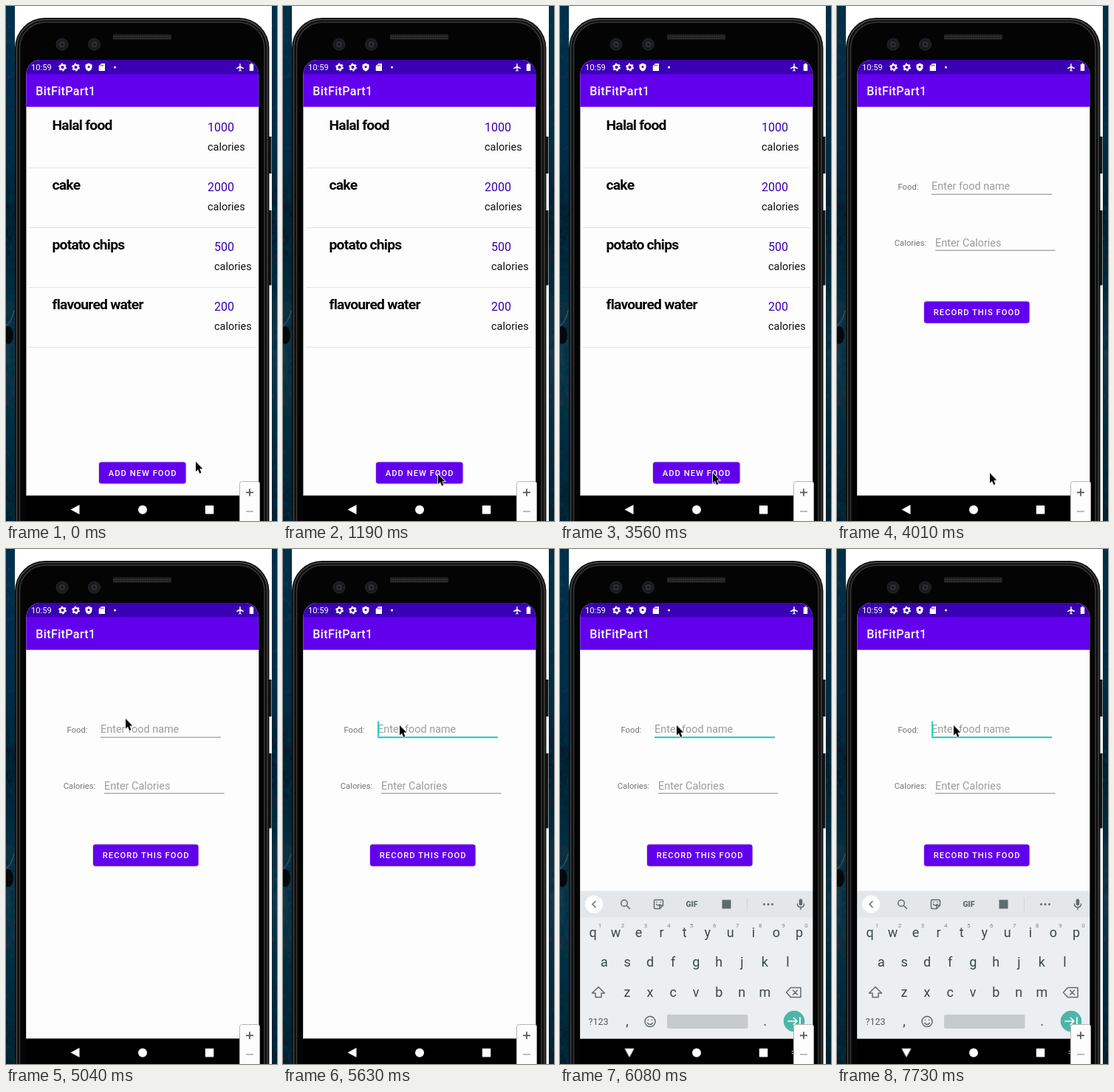
Write an HTML page that moves like this. It is 367 px wide and 698 px high and loops after 8000 ms.

```html
<!DOCTYPE html>
<html lang="en">
<head>
<meta charset="utf-8">
<title>Food log</title>
<style>
  html, body { margin: 0; width: 100%; height: 100%; overflow: hidden; background: #fff; }
  svg { display: block; width: 367px; height: 698px; }
  text { font-family: Roboto, Arial, sans-serif; }
  .line { fill: none; stroke-linecap: round; stroke-linejoin: round; }
  .title { font-size: 16px; font-weight: 500; letter-spacing: .38px; fill: #fff; }
  .name { font-size: 19.24px; font-weight: 700; letter-spacing: -.76px; fill: #050505; }
  .amount { font-size: 16.03px; fill: #3700b3; }
  .unit { font-size: 14.43px; fill: #111; }
  .label { font-size: 11.22px; fill: #757575; }
  .hint { font-size: 14.43px; fill: #9c9c9c; }
  .action { font-size: 11.22px; font-weight: 500; letter-spacing: 1px; fill: #fff; }
  .button { fill: #6200ee; filter: drop-shadow(0 .8px .8px #0005); }
  .key { font-size: 18px; fill: #37474f; text-anchor: middle; }
  .digit { font-size: 8px; fill: #78868c; text-anchor: middle; }

  .pointer, .ripple, .flash, .lift, .home, .form, .focus, .caret,
  .keyboard, .shade, .early, .late, .back { animation: 8s step-end infinite; }
  .ripple, .flash, .form, .focus, .caret, .keyboard, .shade, .late { opacity: 0; }

  .pointer { animation-name: pointer; }
  @keyframes pointer {
    0% { transform: translate(256px, 616px); }
    3.75% { transform: translate(262px, 617px); }
    5.625% { transform: translate(260px, 621px); }
    7.5% { transform: translate(250px, 625px); }
    9.375% { transform: translate(236px, 629px); }
    11.125% { transform: translate(222px, 632px); }
    13% { transform: translate(213px, 633px); }
    14.875% { transform: translate(209px, 633px); }
    24.125% { transform: translate(207px, 632px); }
    26% { transform: translate(206px, 631.5px); }
    53.75% { transform: translate(216px, 600px); }
    55.625% { transform: translate(235px, 520px); }
    57.5% { transform: translate(238px, 425px); }
    59.375% { transform: translate(218px, 320px); }
    61.125% { transform: translate(180px, 242px); }
    63% { transform: translate(161px, 228.5px); }
    64.875% { transform: translate(158px, 235px); }
    66.75%, 100% { transform: translate(157px, 237.5px); }
  }
  .ripple { animation-name: ripple; }
  @keyframes ripple { 0% { opacity: 0; } 31.5% { opacity: .14; } 33.375%, 100% { opacity: 0; } }
  .flash { animation-name: flash; }
  @keyframes flash { 0% { opacity: 0; } 33.375% { opacity: .12; } 35.25%, 100% { opacity: 0; } }
  .lift { animation-name: lift; }
  @keyframes lift {
    0%, 44.5%, 100% { filter: drop-shadow(0 .8px .8px #0005); }
    33.375% { filter: drop-shadow(0 2.5px 1.5px #0006); }
  }
  .home { animation-name: home; }
  @keyframes home { 0% { opacity: 1; } 50.125%, 100% { opacity: 0; } }
  .form { animation-name: form; transform-origin: 184.5px 400px; }
  @keyframes form {
    0% { opacity: 0; transform: none; }
    48.25% { opacity: .85; transform: scale(.96); }
    50.125%, 100% { opacity: 1; transform: none; }
  }
  .focus { animation-name: focus; }
  @keyframes focus { 0% { opacity: 0; } 68.5%, 100% { opacity: 1; } }
  .caret { animation-name: caret; }
  @keyframes caret {
    0%, 76%, 89.125% { opacity: 0; }
    70.375%, 83.5%, 96.625%, 100% { opacity: 1; }
  }
  .keyboard { animation-name: keyboard; }
  @keyframes keyboard {
    0% { opacity: 0; transform: none; }
    74.125% { opacity: .77; transform: translateY(26.5px); }
    76%, 100% { opacity: 1; transform: none; }
  }
  .shade { animation-name: shade; }
  @keyframes shade { 0% { opacity: 0; } 74.125% { opacity: .25; } 76%, 100% { opacity: 0; } }
  .early { animation-name: early; }
  @keyframes early { 0% { opacity: 1; } 76%, 100% { opacity: 0; } }
  .late { animation-name: late; }
  @keyframes late { 0% { opacity: 0; } 76%, 100% { opacity: 1; } }
  .back { animation-name: back; transform-origin: 94px 682.5px; }
  @keyframes back {
    0% { transform: none; }
    74.125% { transform: rotate(-80deg); }
    76%, 100% { transform: rotate(-90deg); }
  }
</style>
</head>
<body>
<svg viewBox="0 0 367 698">
  <defs>
    <linearGradient id="night" x2="0" y2="1">
      <stop offset="0" stop-color="#0c314c"/>
      <stop offset=".3" stop-color="#0c2c45"/>
      <stop offset=".42" stop-color="#081a29"/>
      <stop offset=".58" stop-color="#12303f"/>
      <stop offset=".68" stop-color="#15394b"/>
      <stop offset="1" stop-color="#0a1f2d"/>
    </linearGradient>
    <filter id="rough" x="0" y="0" width="1" height="1">
      <feTurbulence type="fractalNoise" baseFrequency=".16 .09" numOctaves="3" seed="4"/>
      <feColorMatrix values="0 0 0 0 0  0 0 0 0 .03  0 0 0 0 .06  1.8 0 0 0 -.6"/>
      <feComposite operator="in" in2="SourceGraphic"/>
      <feMerge><feMergeNode in="SourceGraphic"/><feMergeNode/></feMerge>
    </filter>
    <pattern id="mesh" width="3" height="3" patternUnits="userSpaceOnUse">
      <rect width="3" height="3" fill="#2b2b2b"/><rect width="1.5" height="1.5" fill="#151515"/>
    </pattern>
    <clipPath id="screen"><rect x="27.4" y="73" width="314.8" height="680" rx="19"/></clipPath>
    <clipPath id="addShape"><rect x="126" y="618.3" width="117.5" height="29" rx="3.2"/></clipPath>
    <g id="gear" fill="none" stroke="#fff">
      <circle r="3.2" stroke-width="2.2"/>
      <circle r="4.6" stroke-width="1.7" stroke-dasharray="2.4 2.417"/>
    </g>
    <g id="camera">
      <circle r="8" fill="#1a1b1d" stroke="#26282a"/>
      <circle r="4" fill="#2b2f34"/><circle r="1.6" fill="#121417"/>
    </g>
  </defs>

  <rect width="367" height="698" fill="#fff"/>
  <g filter="url(#rough)">
    <rect width="12" height="698" fill="url(#night)"/>
    <rect x="360" width="7" height="698" fill="url(#night)"/>
  </g>
  <ellipse cx="3" cy="446" rx="7" ry="12" fill="#04080c"/>
  <path class="line" d="M0 433q7-3 11-20" stroke="#3f6375"/>

  <!-- phone body -->
  <path d="M356 177h3.500v50H356zM356 277h3.500v101.500H356z" fill="#141414"/>
  <rect x="12" y="16" width="344.500" height="780" rx="41" fill="#0d0d0d"/>
  <rect x="14.500" y="18.500" width="339.500" height="780" rx="38.500" fill="none" stroke="#4a4a4a" stroke-width="1.300"/>
  <rect x="18.500" y="22" width="331.500" height="780" rx="35" fill="#040404" stroke="#383838" stroke-width="1.500"/>
  <use href="#camera" x="76" y="52"/>
  <use href="#camera" x="119.500" y="52"/>
  <rect x="145" y="38.500" width="79" height="7" rx="1.500" fill="url(#mesh)"/>

  <g clip-path="url(#screen)">
    <rect x="27" y="73" width="316" height="591" fill="#fdfdfd"/>

    <g class="home">
      <g id="rows"></g>
      <rect class="button lift" x="126" y="618.300" width="117.500" height="29" rx="3.200"/>
      <g clip-path="url(#addShape)" fill="#fff">
        <circle class="ripple" cx="208" cy="633" r="36"/>
        <rect class="flash" x="126" y="618" width="118" height="30"/>
      </g>
      <text class="action" x="138.800" y="637">ADD NEW FOOD</text>
    </g>

    <g class="form">
      <rect x="27" y="137" width="316" height="527" fill="#fdfdfd"/>
      <text class="label" x="82.500" y="248.500">Food:</text>
      <text class="hint" x="128" y="249">Enter food name</text>
      <path d="M128 255.200h163M133 331.200h162.500" stroke="#858585"/>
      <path class="focus" d="M128 255.300h163" stroke="#03cdb9" stroke-width="1.700"/>
      <path class="caret" d="M129 233.500v20.500" stroke="#03cdb9" stroke-width="1.700"/>
      <text class="label" x="77.800" y="325">Calories:</text>
      <text class="hint" x="133" y="325.500">Enter Calories</text>
      <rect class="button" x="118" y="400.500" width="142.500" height="29.200" rx="3.200"/>
      <text class="action" x="130.800" y="419.300">RECORD THIS FOOD</text>
    </g>

    <!-- status and app bars -->
    <rect x="27" y="92" width="316" height="44.700" fill="#6200ee"/>
    <rect x="27" y="73" width="316" height="19.300" fill="#3b00b5"/>
    <text x="34" y="87" font-size="11.200" fill="#fff">10:59</text>
    <use href="#gear" x="76.500" y="83"/>
    <use href="#gear" x="94.500" y="83"/>
    <g fill="#fff">
      <path d="M112 77.500l4.500 2v3.300q0 4-4.500 5.700q-4.500-1.700-4.500-5.700v-3.300z"/>
      <path d="M129 78h5v10h-8.300v-6.700z"/>
      <circle cx="147.500" cy="83" r="1.500"/>
      <path d="M316.300 78.500q.7-1.500 1.400 0v3l4.300 2.500v1.200l-4.300-1.200v2.700l1.200 1v.9l-1.900-.5l-1.900 .5v-.9l1.200-1v-2.700l-4.300 1.200V84l4.300-2.500z"/>
      <path d="M329.800 79h1.500v-1.200h2.400V79h1.500v9h-5.400z"/>
    </g>
    <circle cx="112" cy="82.500" r="1.500" fill="#3b00b5"/>
    <path d="M128.300 79.500v2m1.700-2v2m1.700-2v2" stroke="#3b00b5" stroke-width=".8"/>
    <text class="title" x="40.300" y="121">BitFitPart1</text>

    <!-- navigation bar and keyboard -->
    <rect x="27" y="663.500" width="316" height="40" fill="#000"/>
    <g class="keyboard">
      <rect x="27" y="463.500" width="316" height="200" fill="#eceff1"/>
      <rect x="27" y="463.500" width="316" height="36" fill="#e3e7ea"/>
      <circle cx="46" cy="481.500" r="12" fill="#fff"/>
      <g class="line" stroke="#5f6b70" stroke-width="1.500">
        <path class="early" d="M44.500 477.500l4 4l-4 4"/>
        <path class="late" d="M48 477.500l-4 4l4 4"/>
        <g class="late">
          <circle cx="87" cy="480" r="4.300"/><path d="M90.200 483.200l4.300 4.300"/>
          <path d="M129 475.500h9q1.500 0 1.500 1.500v6l-4.500 4.500h-6q-1.500 0-1.500-1.500v-9q0-1.500 1.500-1.500zM135 487v-4h4M130.500 481.500q2.500 3 5 0M131 478.500v.2M136 478.500v.2"/>
          <path d="M253.500 473v17" stroke="#cdd3d6" stroke-width="1"/>
        </g>
        <path d="M321.500 481q0 4.500 4.500 4.500t4.500-4.500M326 486v2.500"/>
        <path d="M326 476.500v4.500" stroke-width="4.600"/>
        <path d="M52 593.500l8.500 8.500h-4.500v5.500h-8v-5.500h-4.500z"/>
        <path d="M312.500 594.500h13.500v13h-13.500l-6-6.500zM315.500 598l6 6m0-6l-6 6"/>
        <circle cx="122" cy="640.500" r="7"/>
        <path d="M118.500 642.500q3.500 4 7 0M119.500 638v.3M124.500 638v.3"/>
      </g>
      <g class="late" fill="#5f6b70">
        <text x="178.500" y="485.300" font-size="10.500" font-weight="900" text-anchor="middle">GIF</text>
        <rect x="219.500" y="475.500" width="12" height="12"/>
        <circle cx="276.500" cy="481.500" r="1.500"/><circle cx="282" cy="481.500" r="1.500"/><circle cx="287.500" cy="481.500" r="1.500"/>
      </g>
      <g id="keys"></g>
      <text x="52" y="645" font-size="12.500" fill="#4d5b61" text-anchor="middle">?123</text>
      <rect x="145" y="631" width="109.500" height="19" rx="2" fill="#c6cbce"/>
      <circle cx="317" cy="640" r="14.300" fill="#4db6a8"/>
      <path class="line" d="M309 640h12m-4.500-4.500l4.500 4.500l-4.500 4.500M325 635v10" stroke="#fff" stroke-width="1.700"/>
    </g>
    <rect class="shade" x="27" y="663.500" width="316" height="26.500" fill="#000"/>
    <g fill="#fff">
      <path class="back" d="M87.500 682.500l12-6.500v13z"/>
      <circle cx="185" cy="682.700" r="6"/>
      <rect x="269.800" y="677" width="11.500" height="11.500" rx=".8"/>
      <path class="late" d="M314 680h1.300v1.300H314zM314 683h1.300v1.300H314z"/>
    </g>
  </g>

  <!-- zoom control -->
  <rect x="316.500" y="644.500" width="27" height="62" rx="3" fill="#fdfdfd" stroke="#b5b5b5"/>
  <path d="M325 659.300h10M330 654.300v10" stroke="#555" stroke-width="1.700"/>
  <path d="M325 685h10" stroke="#aaa" stroke-width="1.500"/>

  <path class="pointer" d="M1 1.500V15L4 12.200L6.200 17.500L8.400 16.500L6.300 11.300H10.300Z" fill="#000" stroke="#fff" stroke-width="1.600" paint-order="stroke"/>
</svg>
<script>
  const text = (style, x, y, value) => `<text class="${style}" x="${x}" y="${y}">${value}</text>`;

  const foods = [["Halal food", 1000], ["cake", 2000], ["potato chips", 500], ["flavoured water", 200]];
  document.getElementById("rows").innerHTML = foods.map(([name, amount], i) => {
    const top = 138 + 81 * i;
    const x = amount < 1000 ? 282 : 273;
    return text("name", 62.5, top + 30, name) +
      text("amount", x, top + 31.5, amount) +
      text("unit", x, top + 57.7, "calories") +
      `<path d="M31 ${top + 81.5}h307" stroke="#e3e3e3"/>`;
  }).join("");

  const pitch = 31.05;
  const keyRow = (letters, x, y) =>
    [...letters].map((c, i) => text("key", x + pitch * i, y, c)).join("");
  const digits = [..."1234567890"].map((d, i) => text("digit", 54 + pitch * i, 513, d)).join("");
  document.getElementById("keys").innerHTML = digits +
    keyRow("qwertyuiop", 44.5, 525.5) +
    keyRow("asdfghjkl", 60, 566) +
    keyRow("zxcvbnm", 91, 606.5) +
    text("key", 91, 646, ",") + text("key", 277.5, 646, ".");
</script>
</body>
</html>
```
